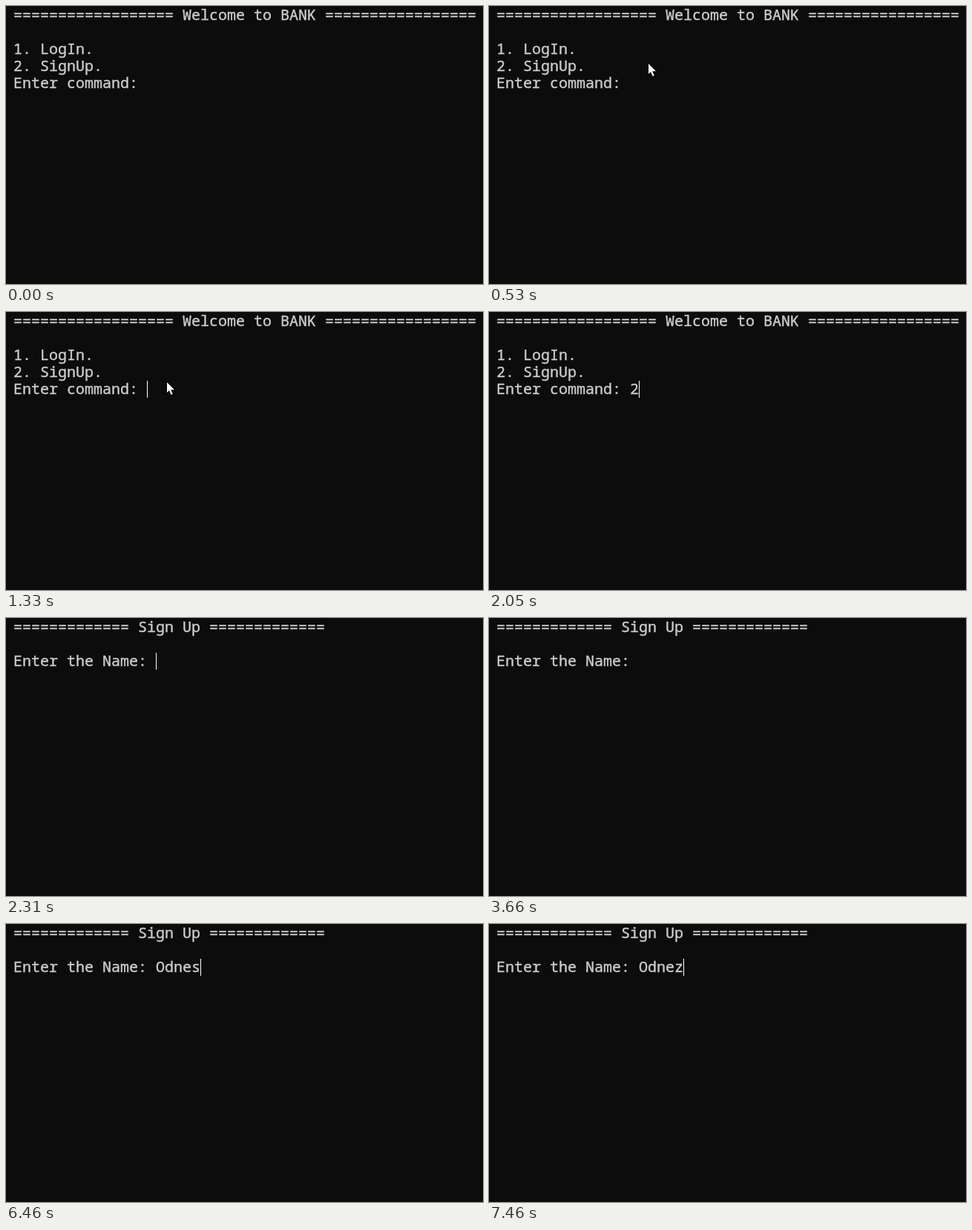
These frames come from a looping animation (643x376 px, 8000 ms). An HTML page with a canvas:

```html
<!DOCTYPE html>
<html lang="en">
<head>
<meta charset="utf-8">
<title>Terminal sign up</title>
<style>
  html, body {
    margin: 0;
    width: 100%;
    height: 100%;
    overflow: hidden;
    background: #0c0c0c;
  }
  pre, canvas {
    position: absolute;
    left: 0;
    top: 0;
    margin: 0;
  }
  pre {
    left: 10px;
    color: #ccc;
    font: 20px/23px "Noto Sans Mono", "DejaVu Sans Mono", monospace;
    font-variant-ligatures: none;
    -webkit-text-stroke: 0.4px #ccc;
  }
</style>
</head>
<body>
<pre id="text"></pre>
<canvas id="overlay" width="643" height="376"></canvas>
<script>
const LOOP = 8000, LEFT = 10, CELL = 12, ROW = 23;
const text = document.getElementById('text');
const ctx = document.getElementById('overlay').getContext('2d');

const rule = n => '='.repeat(n);
const menu = `${rule(18)} Welcome to BANK ${rule(17)}\n\n1. LogIn.\n2. SignUp.\nEnter command: `;
const form = `${rule(13)} Sign Up ${rule(13)}\n\nEnter the Name: `;

// Start time, screen, typed input, caret visible
const states = [
  [0, menu, '', false],
  [1130, menu, '', true],
  [1660, menu, '', false],
  [2050, menu, '2', true],
  [2310, form, '', true],
  [2910, form, '', false],
  [3120, form, '', true],
  [3660, form, '', false],
  [4000, form, 'O', true],
  [4730, form, 'Od', true],
  [5400, form, 'Od', false],
  [5800, form, 'Odn', true],
  [6260, form, 'Odne', true],
  [6460, form, 'Odnes', true],
  [7200, form, 'Odnes', false],
  [7260, form, 'Odne', true],
  [7460, form, 'Odnez', true]
];

const mix = (a, b, p) => a.map((v, i) => Math.round(v + (b[i] - v) * p));
const stepped = (t, start, gap, last) =>
  Math.min(last, Math.floor((t - start) / gap + 1e-6)) / last;

// Pointer tip, or null while hidden
function pointerAt(t) {
  const entry = [548, 340], pause = [215, 78], rest = [217, 95];
  if (t < 130 || t >= 2050) return null;
  if (t < 670) {
    const left = 1 - stepped(t, 130, 400 / 6, 6);
    return mix(entry, pause, 1 - left * left);
  }
  return mix(pause, rest, stepped(t, 670 - 190 / 3, 190 / 3, 4));
}

function drawPointer([x, y]) {
  const shape = [[0, 0], [0, 14], [3, 11], [5.6, 17], [7.8, 16], [5.2, 10.2], [10, 10.2]];
  ctx.beginPath();
  for (const [dx, dy] of shape) ctx.lineTo(x + dx, y + dy);
  ctx.closePath();
  ctx.strokeStyle = '#000';
  ctx.lineWidth = 2;
  ctx.stroke();
  ctx.fillStyle = '#fff';
  ctx.fill();
}

function drawClick() {
  ctx.fillStyle = 'rgba(255, 255, 0, 0.47)';
  ctx.beginPath();
  ctx.arc(216, 94, 15, 0, Math.PI * 2);
  ctx.fill();
}

function render(t) {
  const [, screen, typed, caret] = states.findLast(s => s[0] <= t);
  const content = screen + typed;
  if (text.textContent !== content) text.textContent = content;

  ctx.clearRect(0, 0, 643, 376);
  if (caret) {
    const lines = content.split('\n');
    const row = lines.length - 1;
    ctx.fillStyle = '#fff';
    ctx.fillRect(LEFT + lines[row].length * CELL, 1 + row * ROW, 1, ROW);
  }
  if (t >= 1130 && t < 1330) drawClick();
  const tip = pointerAt(t);
  if (tip) drawPointer(tip);
}

const start = performance.now();
function tick() {
  render((performance.now() - start) % LOOP);
  requestAnimationFrame(tick);
}
tick();
</script>
</body>
</html>
```
